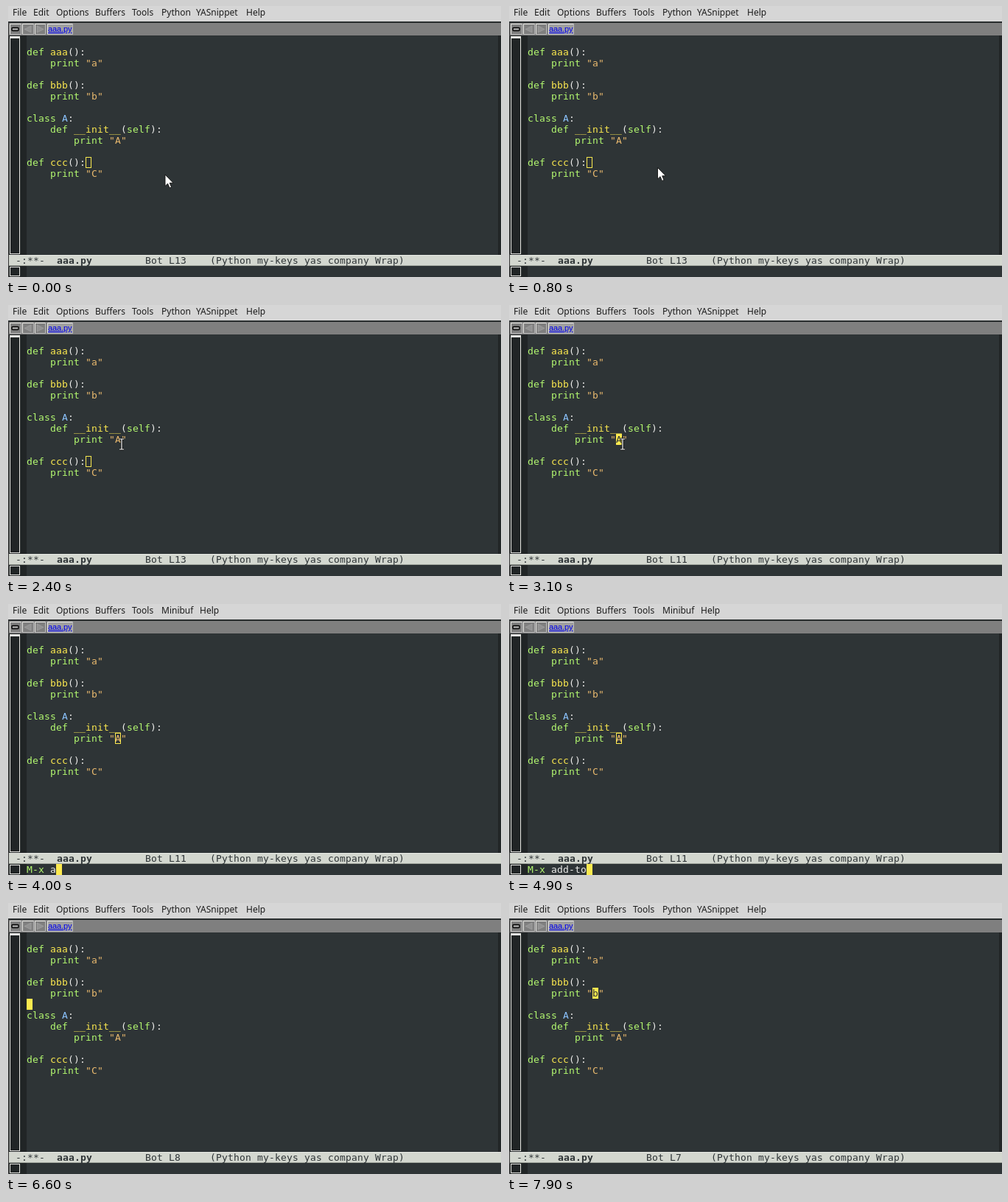
Write an HTML page that moves like this. It is 672 px wide and 368 px high and loops after 8 s.

```html
<!DOCTYPE html>
<html lang="en">
<head>
<meta charset="utf-8">
<title>Editor</title>
<style>
  html, body { margin: 0; width: 100%; height: 100%; overflow: hidden; background: #2e3436; }
  svg { display: block; width: 672px; height: 368px; }
  text { white-space: pre; font: 13px "DejaVu Sans Mono", monospace; letter-spacing: .174px; fill: #eeeeec; }
  .menu text { font: 12px "Noto Sans", sans-serif; letter-spacing: 0; fill: #1c1c1c; }
  .mode text { fill: #2e3436; }
  text.tab { font: 11px "Liberation Sans", Arial, sans-serif; letter-spacing: -.1px; fill: #00e; text-decoration: underline; }
  .k { fill: #b4fa70; }
  .f { fill: #fce94f; }
  .s { fill: #e9b96e; }
  .t { fill: #8cc4ff; }
  .frame { fill: none; stroke: #e8e8e4; }
  .cursor { stroke: #fce94f; }
  text.under { fill: #2e3436; }
</style>
</head>
<body>
<svg viewBox="0 0 672 368">
  <rect width="672" height="368" fill="#2e3436"/>
  <g fill="#212526">
    <rect x="4" y="40" width="24" height="328"/>
    <rect x="668" y="40" width="4" height="298"/>
  </g>
  <rect width="672" height="21" fill="#d6d6d6"/>
  <rect width="3" height="368" fill="#d0d0d0"/>
  <rect x="3" y="21" width="1" height="347" fill="#303030"/>
  <rect x="3" y="21" width="669" height="2" fill="#282c2d"/>
  <g class="menu" id="menu"></g>

  <rect x="4" y="23" width="668" height="17" fill="#7f7f7f"/>
  <g class="frame">
    <path d="M5.5 38V24.5H20M22.5 38V24.5H37M39.5 38V24.5H53M56.5 38V24.5H90"/>
    <path d="M20.5 24V38.5H5M37.5 24V38.5H22M53.5 24V38.5H39M90.5 24V38.5H56" stroke="#b8b8b8"/>
    <rect x="5.5" y="41.5" width="13" height="295"/>
    <path d="M6 43H18" stroke-width="2"/>
    <rect x="5.5" y="354.5" width="13" height="12"/>
  </g>
  <rect x="8" y="29.5" width="9" height="4" rx="1" fill="#aaa" stroke="#000" stroke-width="1.4"/>
  <path d="M34 27V36L25 31.5ZM42 27V36L51 31.5Z" fill="#929292" stroke="#a4a4a4" stroke-width=".7"/>
  <rect x="57" y="25" width="33" height="13" fill="#a0a0a0"/>
  <text class="tab" x="57" y="35">aaa.py</text>

  <g id="code"></g>

  <g class="mode">
    <rect x="4" y="338" width="668" height="15" fill="#d3d7cf"/>
    <path d="M4 338.5H672" stroke="#e9ebe6"/>
    <path d="M4 352.5H672" stroke="#a2a69e"/>
    <text x="13" y="350">-:**-</text>
    <text x="69" y="350" font-weight="bold" style="font-weight:bold">aaa.py</text>
    <text x="189" y="350" id="position"></text>
    <text x="277" y="350">(Python my-keys yas company Wrap)</text>
  </g>

  <text x="28" y="365" class="k" id="prompt">M-x </text>
  <text x="28" y="365" id="echo"></text>
  <rect id="miniCursor" y="353" width="8" height="15" fill="#fce94f"/>
  <rect id="cursor" class="cursor" width="7" height="14"/>
  <text id="under" class="under"></text>

  <path id="arrow" d="M0 0V15.5L3.6 12.2 6 18 8.6 17 6.2 11.3H11Z" fill="#fff" stroke="#111" stroke-width=".9"/>
  <g id="beam" fill="none">
    <path d="M-3 -7H3M-3 7H3M0 -7V7" stroke="#111" stroke-width="3"/>
    <path d="M-3 -7H3M-3 7H3M0 -7V7" stroke="#fff" stroke-width="1.2"/>
  </g>
</svg>
<script>
const $ = id => document.getElementById(id);
const LOOP = 8000, CHAR = 8, LEFT = 28;
const colX = col => LEFT + col * CHAR;
const rowY = line => 10 + line * 15;

// Buffer lines by number; {k|word} marks a coloured word.
const source = {
  3: '{k|def} {f|aaa}():',
  4: '    {k|print} {s|"a"}',
  6: '{k|def} {f|bbb}():',
  7: '    {k|print} {s|"b"}',
  9: '{k|class} {t|A}:',
  10: '    {k|def} {f|__init__}({k|self}):',
  11: '        {k|print} {s|"A"}',
  13: '{k|def} {f|ccc}():',
  14: '    {k|print} {s|"C"}'
};
const mark = /\{(\w)\|(.*?)\}/g;
$('code').innerHTML = Object.entries(source).map(([line, text]) =>
  `<text x="${LEFT}" y="${rowY(line) + 12}">${text.replace(mark, '<tspan class="$1">$2</tspan>')}</text>`
).join('');
const charAt = (line, col) => (source[line] || '').replace(mark, '$2')[col] || '';

const commonMenu = [[9, 'File'], [37, 'Edit'], [68, 'Options'], [121, 'Buffers'], [171, 'Tools']];
const menuMarkup = extra => [...commonMenu, ...extra]
  .map(([x, label]) => `<text x="${x}" y="13">${label}</text>`).join('');
const editMenu = menuMarkup([[211, 'Python'], [258, 'YASnippet'], [326, 'Help']]);
const miniMenu = menuMarkup([[211, 'Minibuf'], [263, 'Help']]);

// [start, line, column]
const moves = [[0, 13, 10], [2600, 11, 15], [6200, 10, 15], [6300, 9, 8],
  [6500, 8, 0], [7100, 7, 13], [7400, 7, 12], [7600, 7, 11]];
// [start, typed command]
const typing = [[3500, ''], [4000, 'a'], [4150, 'ad'], [4300, 'add'], [4450, 'add-'],
  [4650, 'add-t'], [4800, 'add-to'], [5000, 'add-to-'], [5150, 'add-to-g'], [5300, 'add-to-global-ring']];
const MINI = [3500, 5500], MESSAGE = [5500, 6200], FOCUS = 2500, BEAM = [2100, 3500];
const message = 'You can run the command ‘add-to-global-ring’ with C-c SPC';

const within = (t, [a, b]) => t >= a && t < b;
const latest = (list, t) => list.filter(item => item[0] <= t).pop();
const show = (el, on) => el.setAttribute('visibility', on ? 'visible' : 'hidden');
const place = (el, x, y) => { el.setAttribute('x', x); el.setAttribute('y', y); };
const ease = (t, a, b) => {
  const u = Math.min(1, Math.max(0, (t - a) / (b - a)));
  return u * u * (3 - 2 * u);
};

let shownMenu;
function draw(t) {
  const mini = within(t, MINI);
  const menu = mini ? miniMenu : editMenu;
  if (menu !== shownMenu) $('menu').innerHTML = shownMenu = menu;

  const [, line, col] = latest(moves, t);
  const filled = t >= FOCUS && !mini;
  place($('cursor'), colX(col) + .5, rowY(line) + .5);
  $('cursor').setAttribute('fill', filled ? '#fce94f' : 'none');
  place($('under'), colX(col), rowY(line) + 12);
  $('under').textContent = filled ? charAt(line, col) : '';
  $('position').textContent = 'Bot L' + line;

  const typed = mini ? latest(typing, t)[1] : '';
  show($('prompt'), mini);
  show($('miniCursor'), mini);
  $('miniCursor').setAttribute('x', colX(4 + typed.length));
  $('echo').setAttribute('x', colX(mini ? 4 : 0));
  $('echo').textContent = mini ? typed : within(t, MESSAGE) ? message : '';

  const go = ease(t, 500, 1500), settle = ease(t, 1700, 2100);
  const x = 216 - 53 * go - 6 * settle, y = 229 - 44 * go + 4 * settle;
  show($('arrow'), t < BEAM[0]);
  show($('beam'), within(t, BEAM));
  for (const id of ['arrow', 'beam']) $(id).setAttribute('transform', `translate(${x} ${y})`);
}

function tick() {
  draw(performance.now() % LOOP);
  requestAnimationFrame(tick);
}
tick();
</script>
</body>
</html>
```
